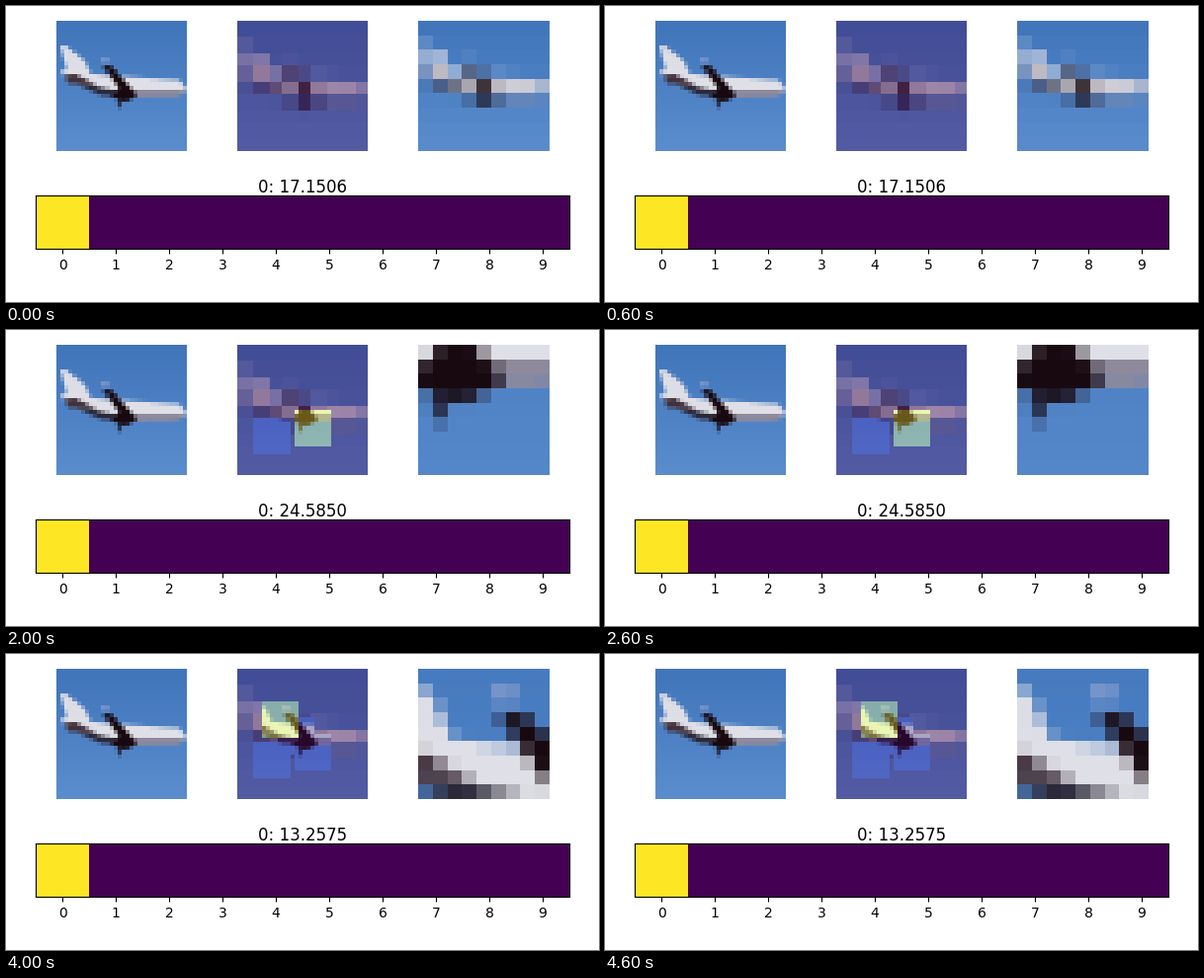
A matplotlib script for the animation above (5 s loop, 600 by 300 pixels).

```python
import numpy as np
import matplotlib.pyplot as plt
from matplotlib.animation import FuncAnimation
from matplotlib.colors import to_rgb
from matplotlib.path import Path

W, H = 600, 300
GRID, GLIMPSE = 32, 9
FINE = GRID * GLIMPSE          # divides evenly into both resolutions
TINT = 0.35

SCORES = [17.1506, 19.9132, 24.5850, 24.5284, 13.2575]
GLIMPSES = [(18, 4), (16, 14), (12, 10), (8, 6)]   # (row, col) of each look

# Flat shapes of the aeroplane, in grid units
TAIL = [(1, 6), (2.4, 6), (7, 10), (8.6, 13.6), (3, 13.6)]
BODY = [(1, 12), (13, 13.4), (30, 14.5), (31.8, 16.4), (31.2, 18), (15, 18),
        (3, 15)]
FLANK = [(19, 17), (31.6, 17), (30, 18.7), (18, 18.9)]
FIN = [(2, 13.2), (4.6, 13), (10, 15.8), (3, 15.4)]
BELLY = [(5, 15.6), (9, 15.9), (15, 17.4), (15, 18.6), (11, 18.4)]
TIP = [(11, 9), (12.8, 9), (12, 11.2)]
WING = [(11.4, 11), (13.4, 11.2), (17, 15), (20, 18.4), (17, 20.1),
        (12.8, 18.4), (15.3, 16.6), (12.8, 13)]
POD = [(14.8, 19.6), (16.2, 19.6), (15.2, 21.8)]

SHAPES = [(TAIL, "#dedee6"), (BODY, "#e0e0e7"), (FLANK, "#8f8a9c"),
          (FIN, "#42323e"), (BELLY, "#2c2a3a"), (TIP, "#849ccc"),
          (WING, "#190a11"), (POD, "#222238")]
SKY_TOP, SKY_LOW = "#4075ba", "#5b8dce"


def paint_scene():
    axis = (np.arange(FINE) + 0.5) * GRID / FINE
    x, y = np.meshgrid(axis, axis)
    points = np.column_stack([x.ravel(), y.ravel()])
    t = (y / GRID)[..., None]
    scene = (1 - t) * np.array(to_rgb(SKY_TOP)) + t * np.array(to_rgb(SKY_LOW))
    for outline, color in SHAPES:
        inside = Path(outline).contains_points(points).reshape(FINE, FINE)
        scene[inside] = to_rgb(color)
    return scene


def shrink(img, n):
    k = len(img) // n
    return img.reshape(n, k, n, k, 3).mean(axis=(1, 3))


scene = paint_scene()
photo = shrink(scene, GRID)
coarse = shrink(scene, GLIMPSE)
nearest = np.arange(GRID) * GLIMPSE // GRID
blurred = coarse[np.ix_(nearest, nearest)]
vivid = np.clip(photo * [1.0, 1.15, 1.27], 0, 1)


def window(row, col):
    return slice(row, row + GLIMPSE), slice(col, col + GLIMPSE)


def memory_view(step):
    """Blurred scene with all looks so far pasted in, the latest highlighted."""
    canvas = blurred.copy()
    mask = np.zeros((GRID, GRID))
    for spot in GLIMPSES[:step]:
        canvas[window(*spot)] = vivid[window(*spot)]
    if step:
        mask[window(*GLIMPSES[step - 1])] = 1
    return (1 - TINT) * canvas + TINT * plt.cm.viridis(mask)[..., :3]


def glimpse_view(step):
    return photo[window(*GLIMPSES[step - 1])] if step else coarse


def add_axes(x, y, w, h):
    return fig.add_axes([x / W, 1 - (y + h) / H, w / W, h / H])


def add_panel(x, img):
    ax = add_axes(x, 15, 132, 132)
    ax.axis("off")
    return ax.imshow(img, interpolation="nearest", aspect="auto")


plt.rcParams["font.family"] = "DejaVu Sans"
fig = plt.figure(figsize=(W / 100, H / 100), dpi=100, facecolor="white")

add_panel(51, photo)
memory = add_panel(234, memory_view(0))
glimpse = add_panel(417, glimpse_view(0))

bar = add_axes(30, 192, 540, 54)
bar.imshow(np.eye(1, 10), cmap="viridis", aspect="auto", interpolation="nearest")
bar.set_xticks(range(10))
bar.set_yticks([])
title = fig.text(0.5, 1 - 189 / H, "", fontsize=12, ha="center", va="baseline")


def update(step):
    memory.set_data(memory_view(step))
    glimpse.set_data(glimpse_view(step))
    title.set_text(f"0: {SCORES[step]:.4f}")
    return memory, glimpse, title


anim = FuncAnimation(fig, update, frames=len(SCORES), interval=1000,
                     repeat=True, repeat_delay=0, blit=False)
plt.show()
```
